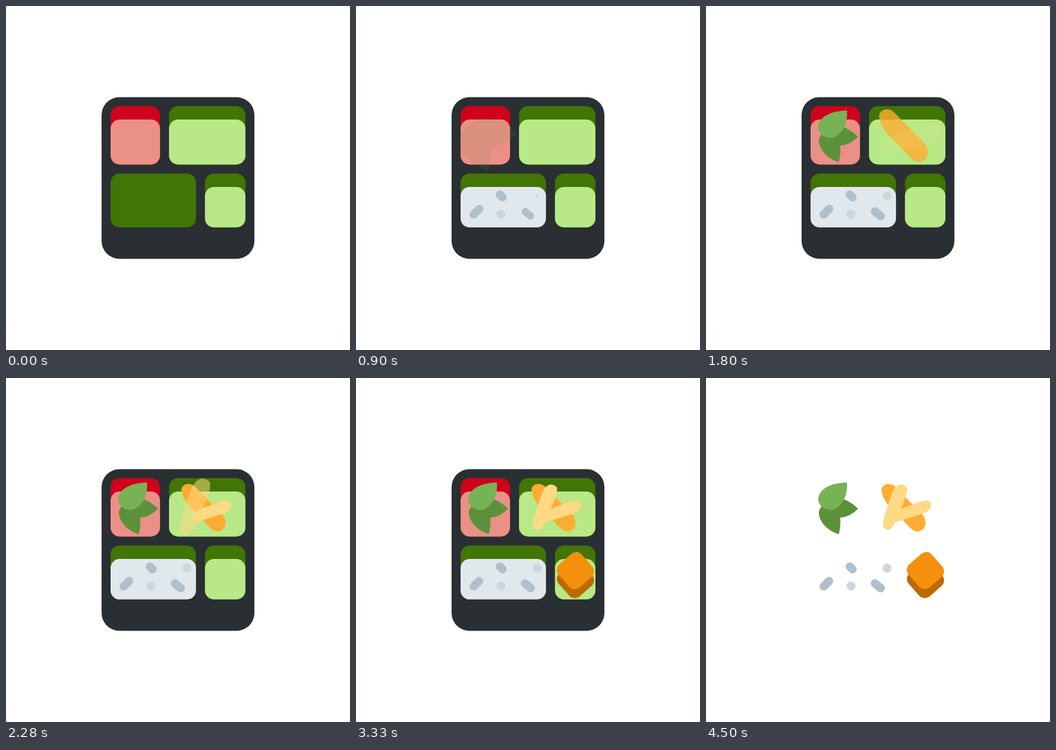
Recreate the animation shown at these times as an HTML page. Size 500 by 500 pixels, loop 4.53 s.

```html
<!DOCTYPE html>
<html lang="en">
<head>
<meta charset="utf-8">
<title>Lunch box</title>
<style>
  html, body { margin: 0; width: 100%; height: 100%; overflow: hidden; background: #fff; }
  svg { display: block; width: 100%; height: 100%; }
  .grain, .food { transform-box: fill-box; transform-origin: center; }
  .grain { stroke: #afbfcb; stroke-width: 12; stroke-linecap: round; }
  .tofu { stroke-width: 22; stroke-linejoin: round; }
</style>
</head>
<body>
<svg viewBox="0 0 500 500">
  <g id="box" transform="translate(132.4 132.4) scale(6.533)">
    <rect x="1" width="34" height="36" rx="4" fill="#292f33"/>
    <rect x="3" y="2" width="11" height="13" rx="2" fill="#d0021b"/>
    <rect x="3" y="5" width="11" height="10" rx="2" fill="#ea9087"/>
    <rect x="16" y="2" width="17" height="13" rx="2" fill="#417505"/>
    <rect x="16" y="5" width="17" height="10" rx="2" fill="#b8e986"/>
    <rect x="3" y="17" width="19" height="12" rx="2" fill="#417505"/>
    <rect x="24" y="17" width="9" height="12" rx="2" fill="#417505"/>
    <rect x="24" y="20" width="9" height="9" rx="2" fill="#b8e986"/>
    <rect id="rice" x="3" y="20" width="19" height="9" rx="2" fill="#e1e8ed"/>
  </g>

  <path class="grain" d="M171 303L179 295"/>
  <circle class="grain" cx="210.7" cy="302.4" r="6.5" fill="#ccd6dd" style="stroke:none"/>
  <path class="grain" d="M209 274L213 278"/>
  <path class="grain" d="M245.5 298.5L254 305.5"/>
  <circle class="grain" cx="263.3" cy="276.3" r="6.5" fill="#ccd6dd" style="stroke:none"/>

  <path class="food" fill="#5c913b" d="M193 227C174 221 164 207 164 195C165 186 180 174 196 175C205 177 214 183 221 190C213 198 205 202 195 203C196 211 195 219 193 227Z"/>
  <path class="food" fill="#77b255" d="M205 152C206 169 200 183 188 190C178 195 163 188 163 176C164 161 182 152 205 152Z"/>
  <path class="food" fill="#ffac33" d="M255 163Q255 158 260 155Q268 152 274 157L312 196Q320 203 319 213Q317 221 309 223Q303 224 297 218L266 186Q256 174 255 163Z"/>
  <path class="food" fill="#ffd983" d="M322 178Q328 181 327 187Q326 192 316 197L278 209Q270 208 271 200Q274 194 286 189L310 180Q317 178 322 178Z"/>
  <path class="food" fill="#ffd983" d="M281 155Q287 154 292 159Q293 166 289 176L274 212Q270 220 264 221Q258 219 257 214Q258 204 262 192L271 166Q275 157 281 155Z"/>
  <path class="food tofu" fill="#bb6a06" stroke="#bb6a06" d="M320 277L335 294L318 309L303 292Z"/>
  <path class="food tofu" fill="#f4900c" stroke="#f4900c" d="M320 264L335 281L318 296L303 279Z"/>
</svg>
<script>
  const LOOP = 4530, BOX_END = 4500;
  const box = document.getElementById('box');
  const rice = document.getElementById('rice');
  const grains = document.querySelectorAll('.grain');
  const foods = document.querySelectorAll('.food');

  // Smooth 0..1 progress of a step
  function ease(time, start, duration) {
    const p = Math.min(1, Math.max(0, (time - start) / duration));
    return p * p * (3 - 2 * p);
  }

  function draw(time) {
    box.style.visibility = time < BOX_END ? 'visible' : 'hidden';
    rice.style.opacity = ease(time, 0, 300);
    grains.forEach((grain, i) => {
      grain.style.transform = `scale(${ease(time, 300 + i * 120, 300)})`;
    });
    foods.forEach((food, i) => {
      const p = ease(time, 770 + i * 300, 600);
      food.style.opacity = p;
      food.style.transform = `scale(${1.55 - 0.55 * p})`;
    });
  }

  const begin = performance.now();
  function tick() {
    draw((performance.now() - begin) % LOOP);
    requestAnimationFrame(tick);
  }
  tick();
</script>
</body>
</html>
```
